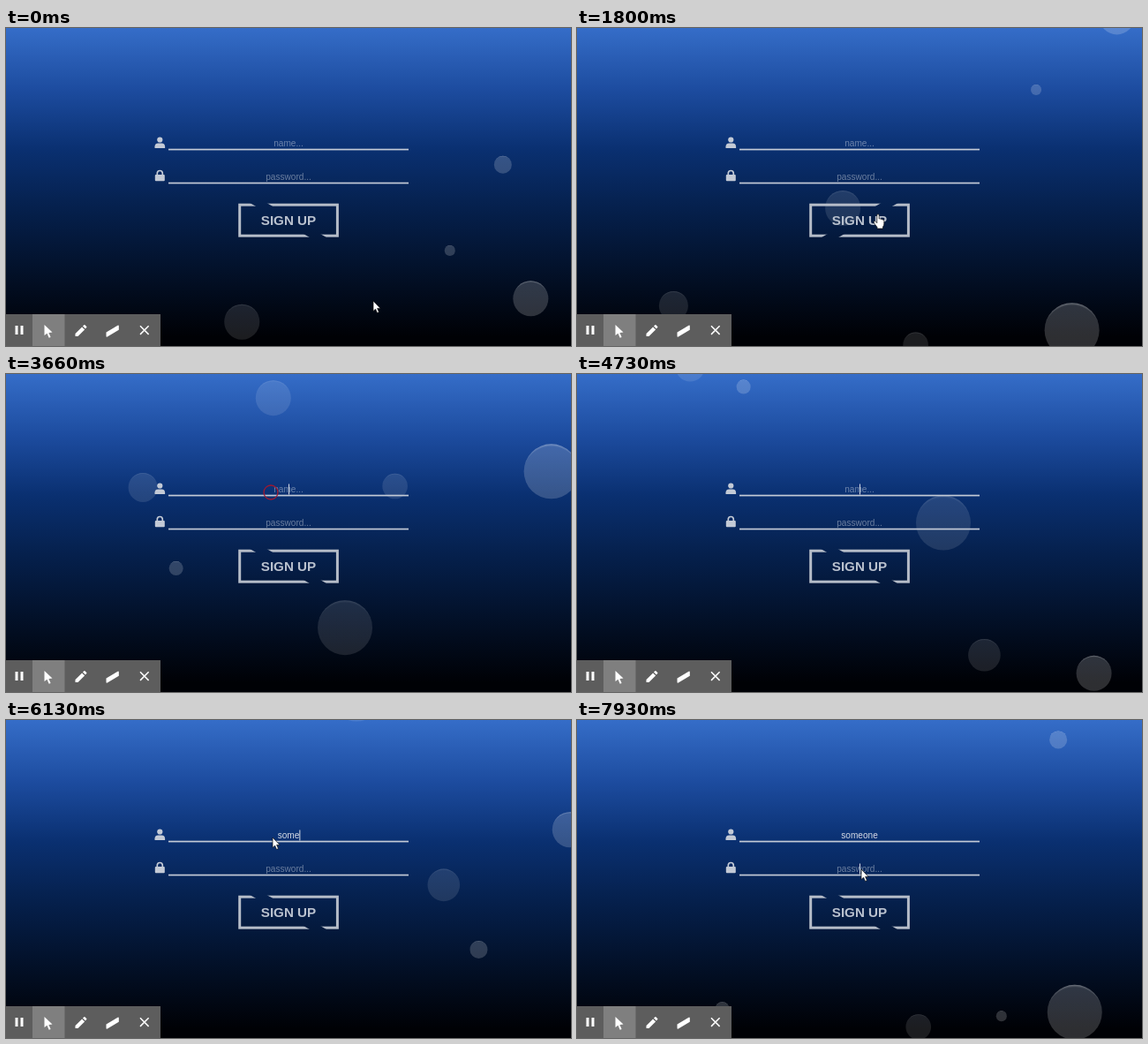
An HTML page that plays this animation: 640 by 360 pixels, repeating every 8 s.

```html
<!DOCTYPE html>
<html lang="en">
<head>
<meta charset="utf-8">
<title>Sign up form with bubbles</title>
<style>
  html, body { margin: 0; width: 100%; height: 100%; overflow: hidden; background: #000; }
  svg { display: block; width: 640px; height: 360px; }
  text { font-family: "Liberation Sans", Arial, sans-serif; font-size: 10.1px; text-anchor: middle; }
</style>
</head>
<body>
<svg viewBox="0 0 640 360">
  <defs>
    <linearGradient id="sea" x2="0" y2="1">
      <stop stop-color="#356dc8"/>
      <stop offset=".2" stop-color="#1c4b9e"/>
      <stop offset=".38" stop-color="#0a3071"/>
      <stop offset=".58" stop-color="#051f4a"/>
      <stop offset=".97" stop-color="#000105"/>
    </linearGradient>
    <radialGradient id="bright" cy=".56" r=".57">
      <stop offset=".9" stop-color="#fff" stop-opacity=".18"/>
      <stop offset="1" stop-color="#fff" stop-opacity=".48"/>
    </radialGradient>
    <radialGradient id="dim" cy=".56" r=".57">
      <stop offset=".9" stop-color="#fff" stop-opacity=".11"/>
      <stop offset="1" stop-color="#fff" stop-opacity=".24"/>
    </radialGradient>
    <mask id="gaps" maskUnits="userSpaceOnUse" x="260" y="195" width="120" height="46">
      <rect x="260" y="195" width="120" height="46" fill="#fff"/>
      <rect id="slash" x="-9.5" y="-20" width="19" height="40"/>
    </mask>
  </defs>

  <rect width="640" height="360" fill="url(#sea)"/>
  <g id="bubbles"></g>

  <g fill="#c3cad6">
    <circle cx="174.300" cy="126.500" r="3.100"/>
    <path d="M168.500 136v-1.700q0-3.800 3.800-3.800h4q3.800 0 3.800 3.800V136z"/>
    <rect x="168.800" y="166" width="11" height="7.300" rx="1"/>
    <path d="M171.300 166.500v-2a3 3 0 0 1 6 0v2" fill="none" stroke="#c3cad6" stroke-width="1.700"/>
    <rect x="184" y="136.700" width="272" height="1.700"/>
    <rect x="184" y="174.700" width="272" height="1.700"/>
  </g>
  <text id="name" x="320" y="134.300"></text>
  <text x="320" y="172.300" fill="#fff" fill-opacity=".4">password...</text>
  <rect id="caret" width="1" height="12" fill="#d5dbe6"/>

  <rect x="264.700" y="200.200" width="110.700" height="35" fill="none" stroke="#b5bcc8" stroke-width="3" mask="url(#gaps)"/>
  <text x="320" y="223" fill="#b9c1ce" style="font-size:15.200px;font-weight:bold">SIGN UP</text>

  <g fill="#fff">
    <rect y="324" width="175" height="36" fill="#5d5d5d"/>
    <rect x="30" y="324" width="36.500" height="36" fill="#7f7f7f"/>
    <path d="M10.500 337h3v10h-3zM16.500 337h3v10h-3z"/>
    <path d="M43.500 336v12l3-2.300 2.200 5 1.900-.8-2.200-4.900 4.100-.4z"/>
    <path d="M78.500 349v-3l7.600-7.600 3 3-7.600 7.600zM87 337.500l1.300-1.300q.6-.6 1.200 0l1.700 1.700q.6.600 0 1.200l-1.300 1.300z"/>
    <path d="M113.500 344.500l13-7.700q1.300-.6 1.300.8v4.200l-13 7.700q-1.300.6-1.300-.8z"/>
    <path d="M152 337.300l9.600 9.600M161.600 337.300l-9.600 9.600" stroke="#fff" stroke-width="1.500"/>
  </g>

  <circle id="click" cx="300" cy="134" r="8" fill="none" stroke="#a01830" stroke-width="1.300"/>
  <g id="pointer" fill="#fff" stroke="#111" stroke-width=".7">
    <path id="arrow" d="M0 0v11.500l2.600-2.300 1.900 4.300 2-.9-1.900-4.200h3.500z"/>
    <path id="hand" d="M-1.200 1q0-1.300 1.200-1.300t1.200 1.300v4q1.300-.6 2 .5 1.300-.5 1.900.6 1.600-.2 1.700 1.400v3.300q0 2-1.300 3.300v2H-1v-1.700q-2.500-2.800-3.800-5.300-.4-1.700 1-1.600.9.100 2.600 2.200z"/>
  </g>
</svg>
<script>
const LOOP = 8000, RISE = 870, DRIFT = 74, RETURN = 222, FLOOR = 430;
const $ = id => document.getElementById(id);

// radius, starting x, duration in s, start in whole seconds, shade
const bubbles = [
  [10, 491.3, 7, -4, 'bright'], [6, 455.5, 9, -4, 'bright'],
  [20, 565, 5, -2, 'bright'], [20, 245, 10, -3, 'dim'],
  [16.500, 81.3, 8, -1, 'dim'], [14.300, 367, 6, 0, 'dim'],
  [31, 544, 6, 0, 'bright'], [31, 352.5, 7, 1, 'dim'],
  [8, 137.6, 5, 1, 'bright'], [18.300, 434.8, 8, 2, 'dim']
].map(([r, x, duration, start, shade]) => {
  const node = document.createElementNS('http://www.w3.org/2000/svg', 'circle');
  node.setAttribute('r', r);
  node.setAttribute('fill', `url(#${shade})`);
  $('bubbles').append(node);
  return { node, r, x, duration, start: start + 0.57 };
});

// CSS-style cubic-bezier(x1, y1, x2, y2)
function bezier(x1, y1, x2, y2) {
  const curve = (a, b, u) => 3 * a * u * (1 - u) ** 2 + 3 * b * u * u * (1 - u) + u ** 3;
  return x => {
    if (x <= 0) return 0;
    if (x >= 1) return 1;
    let low = 0, high = 1;
    for (let i = 0; i < 20; i++) {
      const mid = (low + high) / 2;
      if (curve(x1, x2, mid) < x) low = mid; else high = mid;
    }
    return curve(y1, y2, low);
  };
}
const easeIn = bezier(0.42, 0, 1, 1);
const ease = bezier(0.25, 0.1, 0.25, 1);

// time, x, y of the pointer tip
const pointerPath = [
  [0, 416, 309], [150, 416, 309], [850, 341, 211], [1900, 341, 211], [2450, 350, 232],
  [2650, 350, 232], [3450, 301, 130], [5900, 302, 133], [7000, 302, 133], [7650, 322, 169], [8000, 322, 169]
];
function pointerAt(t) {
  const i = pointerPath.findIndex(point => point[0] > t);
  const [t0, x0, y0] = pointerPath[i - 1], [t1, x1, y1] = pointerPath[i];
  const k = (t - t0) / (t1 - t0), s = k * k * (3 - 2 * k);
  return [x0 + (x1 - x0) * s, y0 + (y1 - y0) * s];
}

const show = (id, visible) => $(id).setAttribute('visibility', visible ? 'visible' : 'hidden');

function drawBubbles(t) {
  for (const { node, r, x, duration, start } of bubbles) {
    const s = (((t / 1000 - start) / duration) % 1 + 1) % 1;
    const drift = s < 0.5 ? DRIFT * easeIn(2 * s) : DRIFT - RETURN * easeIn(2 * s - 1);
    node.setAttribute('cx', x + drift);
    node.setAttribute('cy', FLOOR - r - RISE * easeIn(s));
  }
}

function drawForm(t) {
  const hover = ease((t - 700) / 500) - ease((t - 2345) / 500);
  $('slash').setAttribute('transform', `translate(320 217.700) skewX(${60 - 120 * hover})`);

  const typed = 'someone'.slice(0, Math.max(0, Math.floor((t - 5300) / 220) + 1));
  const name = $('name');
  name.textContent = typed || 'name...';
  name.setAttribute('fill', typed ? '#d5dbe6' : 'rgba(255,255,255,.4)');

  const onPassword = t >= 7800;
  const lastEdit = onPassword ? 7800 : t < 5300 ? 3600 : Math.min(t, 6620);
  const half = typed && !onPassword ? name.getComputedTextLength() / 2 : 0;
  $('caret').setAttribute('x', 320 + half);
  $('caret').setAttribute('y', onPassword ? 162.500 : 124.500);
  show('caret', t >= 3600 && (t - lastEdit) % 1060 < 530);
}

function drawPointer(t) {
  const [x, y] = pointerAt(t);
  const overButton = t > 700 && t < 2700;
  $('pointer').setAttribute('transform', `translate(${x} ${y})`);
  show('hand', overButton);
  show('arrow', !overButton && (t < 3450 || t > 5900));
  show('click', (t > 3560 && t < 3800) || (t > 7740 && t < 7900));
  $('click').setAttribute('cx', t < 5000 ? 300 : 322);
  $('click').setAttribute('cy', t < 5000 ? 134 : 169);
}

const begin = performance.now();
function frame() {
  const t = (performance.now() - begin) % LOOP;
  drawBubbles(t);
  drawForm(t);
  drawPointer(t);
  requestAnimationFrame(frame);
}
frame();
</script>
</body>
</html>
```
